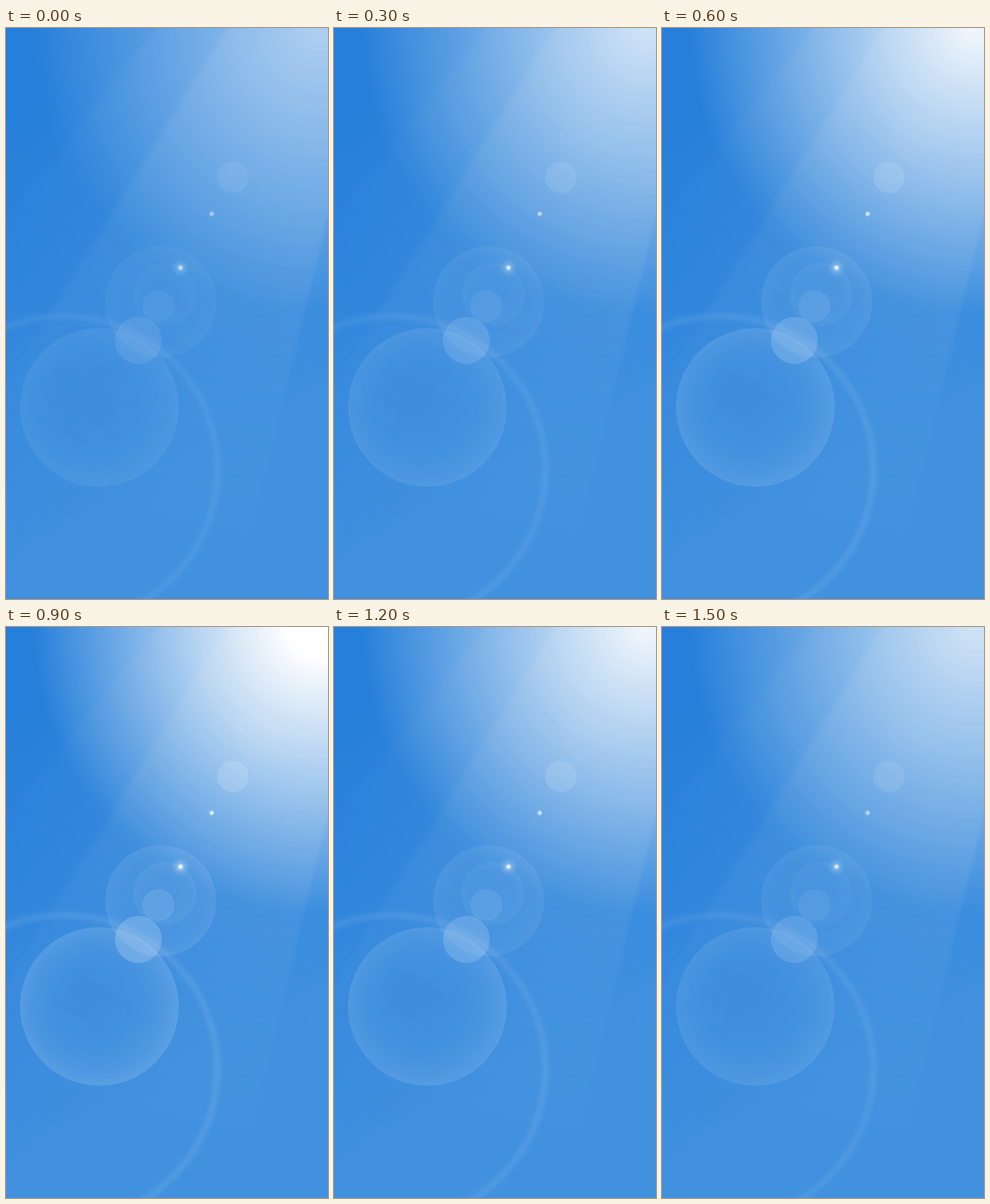
Recreate the animation shown at these times as an HTML page with a canvas. Size 562x997 px, loop 1.8 s.

```html
<!DOCTYPE html>
<html lang="en">
<head>
<meta charset="utf-8">
<title>Sun flare</title>
<style>
  html, body { margin: 0; width: 100%; height: 100%; overflow: hidden; background: #4191df; }
  canvas { display: block; width: 562px; height: 997px; }
</style>
</head>
<body>
<canvas id="sky" width="562" height="997"></canvas>
<script>
const W = 562, H = 997, TAU = Math.PI * 2;
const STEP = 300, STEPS = 6, SAMPLES = 32;
const SUN = { x: 545, y: 0, r: 500 };
const ctx = document.getElementById('sky').getContext('2d');

const white = a => `rgba(255,255,255,${Math.max(0, Math.min(1, a))})`;

// alpha(u) gives the opacity from the centre (u = 0) to the rim (u = 1)
function radial(x, y, r, alpha) {
  const g = ctx.createRadialGradient(x, y, 0, x, y, r);
  for (let i = 0; i <= SAMPLES; i++) g.addColorStop(i / SAMPLES, white(alpha(i / SAMPLES)));
  return g;
}

function disc(x, y, r, alpha) {
  ctx.fillStyle = radial(x, y, r, alpha);
  ctx.beginPath();
  ctx.arc(x, y, r, 0, TAU);
  ctx.fill();
}

function soft(paint) {
  ctx.save();
  ctx.filter = 'blur(4px)';
  ctx.beginPath();
  paint();
  ctx.restore();
}

function backdrop() {
  const g = ctx.createLinearGradient(0, 150, 358, 800);
  g.addColorStop(0, '#267fda');
  g.addColorStop(1, '#4191df');
  ctx.fillStyle = g;
  ctx.fillRect(0, 0, W, H);
}

// A beam whose left edge crosses the top at x and leans by slope
function beam(x, slope, reach, alpha) {
  const top = -40, bottom = H + 20;
  soft(() => {
    ctx.fillStyle = radial(SUN.x, SUN.y, reach, u => alpha * (1 - u));
    ctx.moveTo(x + slope * top, top);
    ctx.lineTo(x + slope * bottom, bottom);
    ctx.lineTo(395, bottom);
    ctx.lineTo(652, top);
    ctx.fill();
  });
}

function sunlight(m) {
  disc(SUN.x, SUN.y, SUN.r, u => 1.12 * m * (1 - u));
  beam(265, -0.815, 700, 0.065);
  beam(385, -0.62, 1000, 0.1);
}

function halo(m) {
  soft(() => {
    ctx.strokeStyle = white(0.05 + 0.06 * m);
    ctx.lineWidth = 10;
    ctx.arc(101, 771, 268, 0, TAU);
    ctx.stroke();
  });
}

function lens(x, y, r, inner, rim = inner) {
  disc(x, y, r, u => inner + (rim - inner) * u ** 3);
}

function lenses(m) {
  lens(163, 662.5, 138.5, 0.01 * m, 0.14 * m);
  lens(270, 478, 97, 0.04 * m, 0.09 * m);
  lens(277.5, 465, 55, 0.03 * m, 0.06 * m);
  lens(266, 485.5, 28, 0.1 * m);
  lens(231, 545.5, 41, 0.19 * m);
  lens(396, 261, 27.5, 0.14 * m);
  lens(437, 190, 42, 0.06 * (m - 0.5));
}

function spark(x, y, r, alpha, power) {
  disc(x, y, r, u => alpha * (1 - u) ** power);
}

function sparks(m) {
  const k = 0.3 + 0.7 * m;
  spark(304.5, 418.5, 18, 0.5 * k, 1.7);
  spark(304.5, 418.5, 5.5, 1.3 * k, 1);
  spark(359, 324.5, 5.5, 1.1 * k, 1);
}

function draw(m) {
  backdrop();
  sunlight(m);
  halo(m);
  lenses(m);
  sparks(m);
}

// Brightness climbs from half to full, then falls back, in equal steps
const level = i => 1 - Math.abs(i - STEPS / 2) / STEPS;

let shown = -1;
const start = performance.now();
function tick() {
  const i = Math.floor((performance.now() - start) / STEP) % STEPS;
  if (i !== shown) draw(level(shown = i));
  requestAnimationFrame(tick);
}
tick();
</script>
</body>
</html>
```
